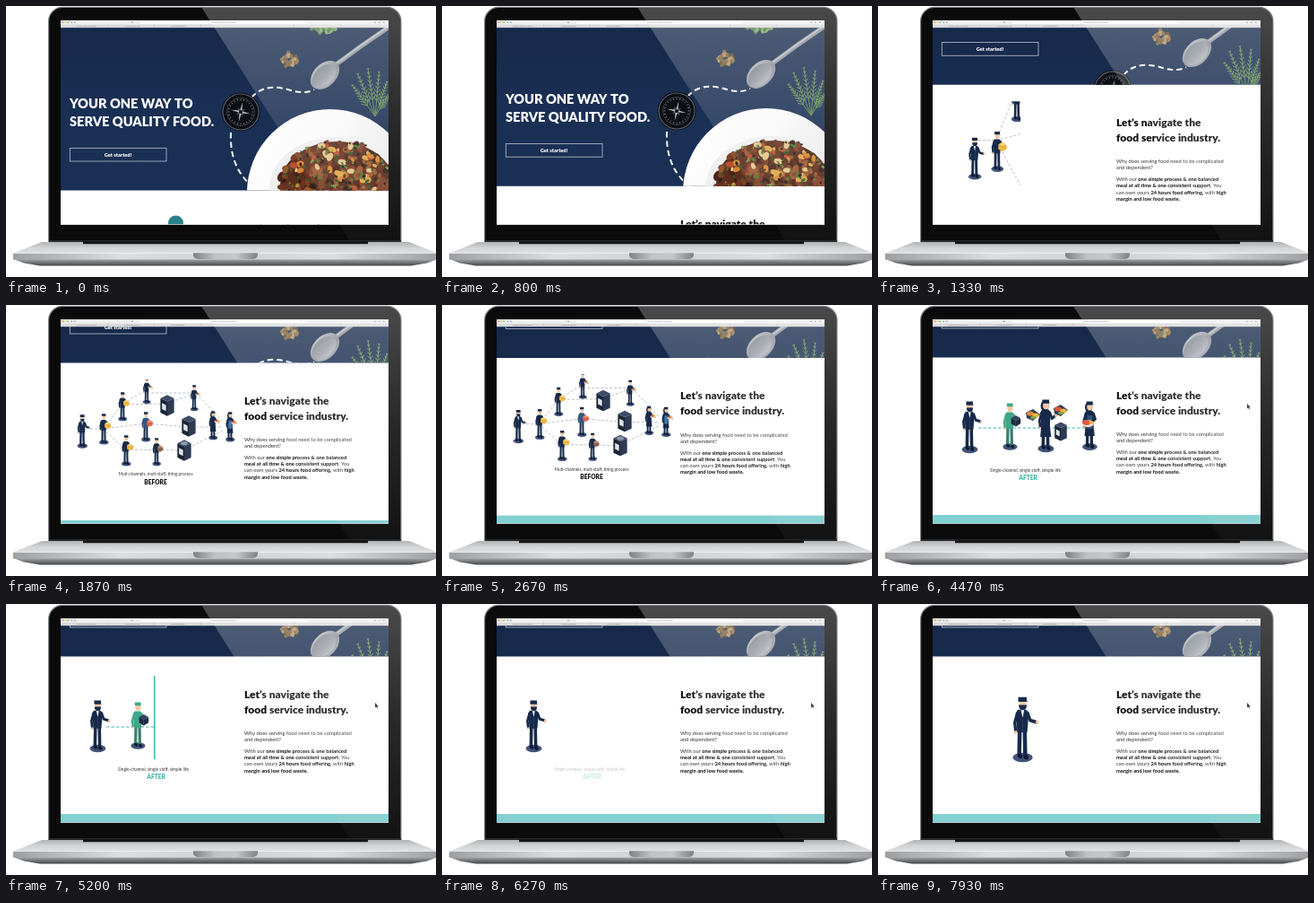
Recreate the animation shown at these times as an HTML page with a canvas. Size 480 by 302 pixels, loop 7990 ms.

```html
<!DOCTYPE html>
<html lang="en">
<head>
<meta charset="utf-8">
<title>Food service site on a laptop</title>
<style>
html, body { margin: 0; width: 100%; height: 100%; overflow: hidden; background: #fff; }
canvas { display: block; width: 480px; height: 302px; }
</style>
</head>
<body>
<canvas id="stage"></canvas>
<script>
const W = 480, H = 302, LOOP = 7990, STEP = 66.6;
const NAVY = '#172a4a', TEAL = '#45b5ac', SKIN = '#f1c9a5', YELLOW = '#f0b43c', GREEN = '#3ea889', RED = '#e2573f';
const canvas = document.getElementById('stage');
const c = canvas.getContext('2d');
const dpr = window.devicePixelRatio || 1;
canvas.width = W * dpr;
canvas.height = H * dpr;

const lerp = (a, b, k) => a + (b - a) * k;
const ramp = (t, a, b) => Math.min(1, Math.max(0, (t - a) / (b - a)));
const ease = (t, a, b) => { const k = ramp(t, a, b); return k * k * (3 - 2 * k); };

function rng(seed) {
  return () => (seed = (seed * 16807) % 2147483647) / 2147483647;
}
function rect(x, y, w, h, fill) {
  c.fillStyle = fill;
  c.fillRect(x, y, w, h);
}
function round(x, y, w, h, r, fill) {
  c.beginPath();
  c.roundRect(x, y, w, h, r);
  c.fillStyle = fill;
  c.fill();
}
function oval(x, y, rx, ry, fill, turn = 0) {
  c.beginPath();
  c.ellipse(x, y, rx, ry, turn, 0, Math.PI * 2);
  c.fillStyle = fill;
  c.fill();
}
function ring(x, y, r, color, width) {
  c.beginPath();
  c.arc(x, y, r, 0, Math.PI * 2);
  c.strokeStyle = color;
  c.lineWidth = width;
  c.stroke();
}
function poly(pts, fill) {
  c.beginPath();
  pts.forEach(([x, y]) => c.lineTo(x, y));
  c.fillStyle = fill;
  c.fill();
}
function line(pts, color, width, dash = []) {
  c.beginPath();
  pts.forEach(([x, y]) => c.lineTo(x, y));
  c.strokeStyle = color;
  c.lineWidth = width;
  c.setLineDash(dash);
  c.stroke();
  c.setLineDash([]);
}
function grad(x0, y0, x1, y1, ...stops) {
  const g = c.createLinearGradient(x0, y0, x1, y1);
  stops.forEach((s, i) => g.addColorStop(i / (stops.length - 1), s));
  return g;
}
function text(str, x, y, size, weight, fill, align = 'left') {
  c.font = `${weight} ${size}px Lato, "Open Sans", sans-serif`;
  c.textAlign = align;
  c.fillStyle = fill;
  c.fillText(str, x, y);
  return c.measureText(str).width;
}
function clipTo(x, y, w, h, draw) {
  c.save();
  c.beginPath();
  c.rect(x, y, w, h);
  c.clip();
  draw();
  c.restore();
}

// Scattered pieces: uniform within an ellipse
function scatter(seed, n, x, y, rx, ry, size, colors) {
  const r = rng(seed);
  return Array.from({ length: n }, () => {
    const a = r() * Math.PI * 2, d = Math.sqrt(r());
    return [x + Math.cos(a) * d * rx, y + Math.sin(a) * d * ry,
      size * (0.6 + r() * 0.7), r() * 3, colors[Math.floor(r() * colors.length)]];
  });
}
const bits = list => list.forEach(([x, y, s, a, col]) => oval(x, y, s, s * 0.65, col, a));
const meal = [
  ...scatter(77, 230, 370, 199, 64, 48, 4.6, ['#4a2518', '#6a3520', '#7c4226', '#9a5a30', '#33201a', '#8a3f28']),
  ...scatter(411, 60, 372, 190, 54, 38, 4, ['#d98a34', '#e0a848', '#b9512f', '#e3c48a', '#6b3520']),
  ...scatter(903, 150, 372, 192, 62, 44, 1.8, ['#4f7a35', '#7d9a48', '#36592b', '#2a1c16'])
];
const nuts = scatter(58, 40, 317, 59, 9, 8, 2.5, ['#8d6d49', '#b2925f', '#5d472f', '#77613a']);
const leaves = scatter(19, 45, 354, 22, 15, 8, 2.8, ['#4f7d45', '#6a9955', '#3d6a3c', '#7ba662']);

function compass(x, y) {
  oval(x, y, 21.5, 21.5, '#0c0f14');
  ring(x, y, 20, '#59606a', 1.2);
  ring(x, y, 15.5, '#3a4049', 1);
  for (let i = 0; i < 24; i++) {
    const a = i * Math.PI / 12, p = r => [x + Math.cos(a) * r, y + Math.sin(a) * r];
    line([p(12.5), p(14.5)], '#aeb4bc', 0.6);
  }
  for (let i = 0; i < 8; i++) {
    c.save();
    c.translate(x, y);
    c.rotate(i * Math.PI / 4 + 0.2);
    poly([[0, i % 2 ? -6 : -11], [1.1, -1.5], [-1.1, -1.5]], i % 2 ? '#646b75' : '#c3c8ce');
    c.restore();
  }
  oval(x, y, 2, 2, '#15181d');
}

// Feathery stalks fanning up from one stem
function dill(x, y) {
  for (let i = 0; i < 6; i++) {
    const a = -2.2 + i * 0.24, len = 36 + 18 * Math.sin(i * 0.62 + 0.4);
    const at = k => [x + Math.cos(a) * len * k, y + Math.sin(a) * len * k];
    line([[x, y], at(1)], '#5f8a4c', 1);
    for (let k = 0.35; k < 1; k += 0.09) {
      const [px, py] = at(k), s = 7 * (1.25 - k);
      for (const turn of [-0.7, 0.7]) {
        line([[px, py], [px + Math.cos(a + turn) * s, py + Math.sin(a + turn) * s]], '#6f9c56', 0.9);
      }
    }
  }
}

function photo() {
  c.strokeStyle = '#f4f6f8';
  c.lineWidth = 2;
  c.setLineDash([6.5, 4]);
  c.beginPath();
  c.moveTo(274, 102);
  c.bezierCurveTo(287, 87, 305, 90, 318, 94);
  c.bezierCurveTo(328, 97, 337, 97, 344, 93);
  c.stroke();
  c.beginPath();
  c.moveTo(251, 141);
  c.bezierCurveTo(250, 165, 256, 188, 281, 206);
  c.stroke();
  c.setLineDash([]);
  compass(262, 118);

  line([[366, 67], [396, 45], [428, 23]], '#8d939b', 5);
  line([[366, 66], [396, 44], [428, 22]], '#b9bdc3', 1.6);
  oval(356, 77, 19, 12.5, grad(344, 64, 368, 91, '#c3c7cc', '#878c95', '#a4a8af'), -0.78);
  oval(355, 78, 16, 10, grad(345, 68, 366, 89, '#777d87', '#9499a1', '#c2c5ca'), -0.78);

  bits(nuts);
  bits(leaves);
  dill(412, 123);

  oval(363, 210, 95, 95, 'rgba(5,12,28,.35)');
  oval(362, 208, 93, 93, grad(285, 125, 420, 205, '#ffffff', '#f9f9f9', '#e9eaec'));
  oval(367, 204, 73, 58, '#efefef');
  oval(370, 200, 64, 49, '#5a2e1e');
  bits(meal);
}

function box(x, y, s, col, top) {
  poly([[x - s, y - s * .5], [x, y], [x, y + s], [x - s, y + s * .5]], col);
  poly([[x, y], [x + s, y - s * .5], [x + s, y + s * .5], [x, y + s]], col);
  poly([[x - s, y - s * .5], [x, y - s], [x + s, y - s * .5], [x, y]], top);
}

// A figure 100 units tall standing on its own origin
function person(x, y, h, o = {}) {
  const coat = o.coat || NAVY, legs = o.legs || NAVY, hat = o.hat || NAVY;
  c.save();
  c.translate(x, y);
  c.scale(h / 122, h / 102);
  c.lineCap = c.lineJoin = 'round';
  oval(1, 0, 20, 8, '#42547a');
  line([[-5, -46], [-6, -4]], legs, 8);
  line([[5, -46], [6, -2]], legs, 8);
  line([[-6, -3], [-3, -2]], '#0e1a30', 7);
  line([[6, -1], [9, 0]], '#0e1a30', 7);
  line([[-10, -73], [-15, -58], [-13, -44]], coat, 6);
  oval(-13, -42, 3, 3, SKIN);
  poly([[-9, -80], [8, -80], [13, -74], [10, -42], [-10, -42], [-13, -74]], coat);
  if (o.dress) poly([[-10, -52], [10, -52], [14, -24], [-13, -24]], coat);
  if (o.apron) poly([[-6, -70], [8, -70], [9, -40], [-7, -40]], o.apron);
  if (o.man) {
    poly([[-3, -80], [4, -80], [1, -66]], '#f3f3f3');
    line([[1, -64], [1, -44]], '#3c5178', 1);
  }
  const hand = o.hand || [28, -59];
  line([[11, -74], [16, -62], hand], coat, 6);
  oval(hand[0] + 2, hand[1], 3.4, 3, SKIN);
  if (o.dress) oval(-2, -88, 10, 11, hat);
  oval(1, -89, 7.5, 8, SKIN);
  if (o.man) {
    c.beginPath();
    c.arc(1, -87, 8, -0.1, Math.PI + 0.1);
    c.fillStyle = NAVY;
    c.fill();
  }
  poly([[-8, -101], [9, -101], [9, -94], [13, -93], [-8, -93]], hat);
  if (o.box) box(17, -60, 13, o.box, o.lid || o.box);
  if (o.tray) {
    oval(19, -61, 13, 4.5, '#e9ecef');
    oval(17, -65, 7, 5, o.tray);
    oval(24, -64, 5, 4, YELLOW);
  }
  c.restore();
}

function kiosk(x, y, s) {
  poly([[x - s * .85, y - s * .9], [x, y - s * .5], [x, y + s * 1.3], [x - s * .85, y + s * .9]], '#1b2537');
  poly([[x, y - s * .5], [x + s * .85, y - s * .9], [x + s * .85, y + s * .9], [x, y + s * 1.3]], '#2d3a52');
  poly([[x - s * .85, y - s * .9], [x, y - s * 1.3], [x + s * .85, y - s * .9], [x, y - s * .5]], '#3d4b66');
  poly([[x - s * .65, y - s * .3], [x - s * .15, y - s * .05], [x - s * .15, y + s * .7], [x - s * .65, y + s * .45]], '#dfe4ea');
}

const man = (x, y, h) => person(x, y, h, { man: true });

function before(t) {
  const intro = ease(t, 760, 1330), k = ease(t, 1300, 1820);
  const px = x => lerp(108 + (x - 85) * 1.05, x, k);
  const py = y => lerp(161 + (y - 151) * 2.15, y, k);
  const z = lerp(1.32, 1, k);
  const put = (x, y, h, o) => person(px(x), py(y), h * z, o);
  const link = pts => line(pts.map(([x, y]) => [px(x), py(y)]), '#a9b1bd', 0.8, [3, 2]);
  const carrier = { box: YELLOW, lid: '#f8cf75' };
  const edge = lerp(158, 264, k);
  if (intro < 1 && t < 1250) {
    man(lerp(161, 108, intro), lerp(171, 161, intro), lerp(68, 44, intro));
    return;
  }
  clipTo(72, 77, edge - 72, 101, () => {
    link([[89, 132], [108, 132], [130, 105], [150, 92], [212, 92], [242, 124]]);
    link([[108, 132], [133, 155], [198, 156], [242, 134]]);
    link([[108, 132], [157, 126], [204, 130], [242, 130]]);
    link([[130, 105], [180, 104], [212, 92]]);
    man(px(85), py(151), lerp(44, 35, k));
    put(109, 147, 32, carrier);
    put(130, 121, 30, carrier);
    if (k > 0.12) put(134, 171, 32, carrier);
    if (k > 0.05) {
      put(157, 102, 27, { tray: '#8b5b48' });
      put(156, 144, 31, { coat: '#31577f', box: RED, lid: '#f08a72' });
      put(168, 171, 29, { box: '#8b5b48', lid: '#b98a6c' });
      kiosk(px(180), py(106), 9 * z);
      kiosk(px(204), py(129), 9 * z);
      kiosk(px(199), py(156), 9 * z);
      oval(px(199), py(148), 4, 2, '#8c97a8');
      put(210, 110, 27, { tray: '#8b5b48' });
      put(231, 142, 30, { dress: true, tray: RED });
      put(250, 144, 31, { dress: true, apron: '#3c79a8', tray: RED });
    }
  });
}

function food(x, y, col) {
  poly([[x - 8, y - 3], [x, y - 7], [x + 8, y - 1], [x, y + 6], [x - 7, y + 3]], '#2f3c52');
  oval(x - 3, y - 2, 4, 2.5, col);
  oval(x + 3, y, 3.6, 2.5, YELLOW);
  oval(x, y + 2.5, 3, 1.8, '#79a850');
}

function afterCast() {
  line([[112, 137], [229, 137]], TEAL, 1, [3.5, 2]);
  person(147, 158, 49, { coat: GREEN, legs: '#37806f', hat: GREEN, box: '#1c2a43', lid: '#34445f' });
  food(173, 123, '#e68a3a');
  person(187, 160, 55, { dress: true, hand: [24, -68] });
  food(204, 118, RED);
  kiosk(204, 141, 8);
  person(236, 158, 51, { dress: true, apron: '#31517a', hand: [4, -54] });
  oval(234, 132, 7, 4, '#f1e9dd');
  oval(233, 131, 5, 3, RED);
  oval(238, 131, 2.5, 2, YELLOW);
}

const wipeBar = x => line([[x, 80], [x, 173]], TEAL, 1.6);

function diagram(t) {
  if (t < 400) clipTo(170, 80, 40, 30, () => oval(189.5, 95, 8.5, 8.5, '#2a7f8c'));
  if (t < 760) return;
  const open = lerp(262, 80, ramp(t, 2930, 3727));
  const shut = lerp(262, 116, ramp(t, 4773, 5413));
  if (t < 2930) before(t);
  else if (t < 3727) {
    // Close to the bar's end the larger man takes over on the left
    clipTo(72, 77, open - 72, 101, () => open > 125 ? before(t) : man(100, 161, 53));
    clipTo(open, 77, 264 - open, 101, afterCast);
    wipeBar(open);
  } else {
    const k = ease(t, 6600, 7500);
    if (t < 5413) clipTo(72, 77, shut - 72, 101, afterCast);
    man(lerp(102, 161, k), lerp(161, 171, k), lerp(54, 68, k));
    if (t > 4773 && t < 5413) wipeBar(shut);
  }
  if (t > 1500 && t < 2930) {
    c.globalAlpha = ramp(t, 1500, 1750);
    text('Muti-channels, muti-staff, tiring process', 167, 184.2, 4.75, 400, '#333', 'center');
    text('BEFORE', 167, 193.8, 6.6, 900, '#111', 'center');
  } else if (t >= 2930 && t < 6400) {
    c.globalAlpha = 1 - ramp(t, 5900, 6400);
    text('Single-channel, single staff, simple life', 164.5, 185.7, 4.8, 400, '#333', 'center');
    text('AFTER', 167.5, 195, 6.6, 900, TEAL, 'center');
  }
  c.globalAlpha = 1;
}

function copy() {
  text('Let’s navigate the', 266, 104.6, 12, 900, '#0d0d0d');
  text('food service industry.', 266, 121.6, 12, 900, '#0d0d0d');
  const rows = [
    [146, 'Why does serving food need to be complicated'],
    [153, 'and dependent?'],
    [166.2, 'With our ', 'one simple process & one balanced'],
    [173.2, '', 'meal at all time & one consistent support', ', You'],
    [180.4, 'can own yours ', '24 hours food offering,', ' with ', 'high'],
    [187.8, '', 'margin and low food waste.']
  ];
  for (const [y, ...parts] of rows) {
    let x = 266;
    parts.forEach((p, i) => { x += text(p, x, y, 5.8, i % 2 ? 700 : 400, i % 2 ? '#111' : '#333'); });
  }
}

function page(t) {
  const s = t < 788 ? 0 : 147 * (1 - Math.exp(-(t - 788) / 337));
  rect(61, 16, 366, 228, '#fff');
  const end = 205.5 - s;
  clipTo(61, 24, 366, end - 24, () => {
    rect(61, 24, 366, 182, grad(0, 24, 0, 205, '#16294a', '#1a2f54', '#1a3055'));
    c.save();
    c.translate(0, -0.212 * s);
    photo();
    c.restore();
    c.save();
    c.translate(0, -s);
    text('YOUR ONE WAY TO', 71, 114, 14.6, 900, '#fff');
    text('SERVE QUALITY FOOD.', 71, 134, 14.6, 900, '#fff');
    c.strokeStyle = '#b9c1ce';
    c.lineWidth = 0.8;
    c.strokeRect(71.3, 158.3, 107.7, 14.7);
    text('Get started!', 125, 167.6, 5.7, 900, '#fff', 'center');
    c.restore();
  });
  c.save();
  c.translate(0, 147 - s);
  diagram(t);
  copy();
  rect(61, 234, 366, 60, '#82d0d1');
  c.restore();
  rect(61, 243.2, 366, 0.8, '#c9cdd0');
}

function toolbar() {
  rect(61, 16, 366, 4.5, '#efefef');
  rect(61, 20.5, 366, 3.7, '#d9dadb');
  ['#ee6a5f', '#f5bd4f', '#61c454'].forEach((col, i) => oval(63.5 + i * 2.8, 18.2, 0.9, 0.9, col));
  round(150, 16.8, 186, 3, 1, '#fff');
  text('www.plainmeals.example', 243, 19.2, 2.6, 400, '#666', 'center');
  ['Fresh kitchen ideas', 'Menu planning', 'Serving guide'].forEach((s, i) =>
    text(s, 90 + i * 51, 23.3, 2.6, 400, '#777', 'center'));
  [113, 165, 217, 321, 373].forEach(x => rect(x, 20.5, 0.5, 3.7, '#b5b6b8'));
  [72.5, 76, 140, 411, 416, 421].forEach(x => rect(x, 17.5, 1.6, 1.4, '#9a9a9a'));
}

function laptop() {
  round(47, 0.8, 394.5, 270, [16, 16, 0, 0], '#7d7f82');
  round(48.2, 2, 392.1, 268, [15, 15, 0, 0], '#0b0b0c');
}

function base() {
  rect(48, 261, 393, 2, '#2a2b2d');
  poly([[40, 263], [450, 263], [482, 275.5], [8, 275.5]], grad(0, 263, 0, 276, '#b0b2b4', '#d2d3d4', '#e0e1e2'));
  rect(86, 262, 318, 3.2, '#161617');
  poly([[8, 275], [482, 275], [482, 282], [470, 286.5], [452, 289.5], [38, 289.5], [20, 286.5], [8, 282]],
    grad(0, 281, 0, 290, '#b4b6b8', '#77797c', '#3d3f42'));
  rect(8, 275, 474, 7.5, grad(8, 0, 482, 0, '#9d9fa2', '#dcddde', '#cfd0d2', '#dcddde', '#9d9fa2'));
  rect(8, 275, 474, 0.8, '#f4f4f4');
  round(209, 275.3, 72, 6.6, [0, 0, 5, 5], grad(209, 0, 281, 0, '#7d7f82', '#bfc1c3', '#c6c7c9', '#7d7f82'));
}

function glare() {
  c.save();
  c.beginPath();
  c.roundRect(48.2, 2, 392.1, 259, [15, 15, 0, 0]);
  c.clip();
  poly([[218, 1], [443, 1], [443, 262], [384, 262]],
    grad(0, 1, 0, 262, 'rgba(255,255,255,.26)', 'rgba(255,255,255,.12)', 'rgba(255,255,255,.03)'));
  c.restore();
}

function cursor(x, y) {
  poly([[x, y - 3], [x, y + 2.6], [x + 1.3, y + 1.5], [x + 2.2, y + 3.2], [x + 3, y + 2.8], [x + 2.2, y + 1.2], [x + 3.7, y + 1]], '#222');
}

function draw(now) {
  const n = Math.min(119, Math.floor((now % LOOP + 5) / STEP));
  const t = n * STEP;
  c.setTransform(dpr, 0, 0, dpr, 0, 0);
  rect(0, 0, W, H, '#fff');
  laptop();
  clipTo(61, 16, 366, 228, () => {
    page(t);
    toolbar();
    if (t > 4400) cursor(412, 113);
  });
  glare();
  base();
}

const start = performance.now();
function tick() {
  draw(performance.now() - start);
  requestAnimationFrame(tick);
}
tick();
</script>
</body>
</html>
```
